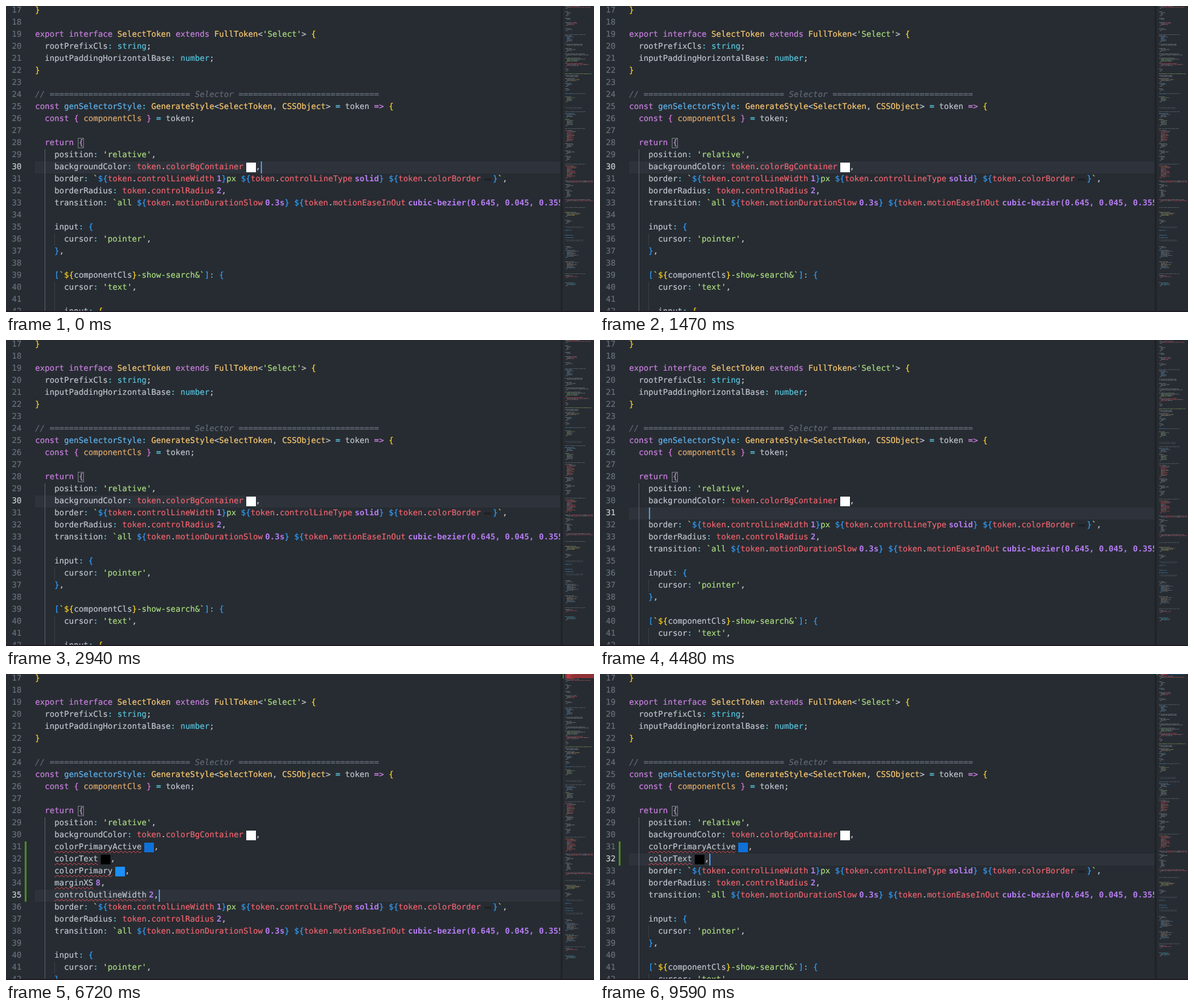
Write an HTML page with a canvas that moves like this. It is 974 by 508 pixels and loops after 9.94 s.

```html
<!DOCTYPE html>
<html lang="en">
<head>
<meta charset="utf-8">
<title>Editor: token hints</title>
<style>
  html, body { margin: 0; width: 100%; height: 100%; overflow: hidden; background: #272c32; }
  #stage {
    position: relative; width: 974px; height: 508px; overflow: hidden; background: #272c32;
    font: 13.31px/20px "DejaVu Sans Mono", "Liberation Mono", monospace;
    letter-spacing: .018px; -webkit-text-stroke: .2px;
    text-rendering: geometricPrecision; font-variant-ligatures: none; color: #c0c6ce;
  }
  .row { position: absolute; left: 0; width: 921px; height: 20px; overflow: hidden; white-space: pre; }
  .row.cur { background: linear-gradient(#2e333b, #2e333b) 48px 0 no-repeat; }
  .num { position: absolute; left: 9.8px; color: #68717c; }
  .active .num { color: #ccd1d7; }
  .code { position: absolute; left: 48.2px; top: 0; height: 20px; }
  .sel { background: #3e4450; border-radius: 3px; }
  .nl { padding-right: 8px; }
  .tail { display: inline-block; width: 8px; height: 20px; vertical-align: top; background: #3e4450; }
  .guide { position: absolute; top: 0; width: 1px; height: 20px; background: #3a4047; }
  .guide.on { background: #5a6169; }
  .added { position: absolute; left: 31px; width: 3px; height: 20px; background: #4b8a28; }
  .caret { position: absolute; top: 0; width: 2px; height: 20px; margin-left: .5px; background: #4d9df0; }
  .off .caret { visibility: hidden; }
  .p { color: #cb82e2; } .y { color: #fdcb72; } .g { color: #acdf80; } .c { color: #58c7df; }
  .r { color: #f0646f; } .b { color: #61b6f2; } .o { color: #e1aa6a; }
  .m { color: #626a75; font-style: italic; }
  .w { color: #59616c; }
  .i1 { color: #ffd21f; } .i2 { color: #d676d8; } .i3 { color: #2f9dfa; }
  .x { color: #bb8fc4; box-shadow: 0 0 0 1px #7d838a; }
  .picking .x { color: #d676d8; box-shadow: none; }
  .h { color: #b57df2; font-weight: bold; margin-left: 4px; -webkit-text-stroke: 0; }
  .s, .d { display: inline-block; width: 16px; height: 16px; margin: 2px 0 0 4.4px; vertical-align: top; }
  .d { margin-left: 4px; background: linear-gradient(#1e2227, #1e2227) 2px 6px / 12px 4px no-repeat; }
  .e {
    text-decoration: underline wavy #e5484d 1px; text-underline-offset: 2px;
    text-decoration-skip-ink: none;
  }
  #map { position: absolute; left: 922px; top: 0; }
  #edge { position: absolute; left: 918px; top: 0; width: 4px; height: 508px;
    background: linear-gradient(90deg, #24292e, #1c2024); }
  #foot { position: absolute; left: 0; bottom: 0; width: 974px; height: 2px; background: #201d26; }
</style>
</head>
<body>
<div id="stage">
  <div id="rows"></div>
  <div id="edge"></div>
  <canvas id="map" width="52" height="508"></canvas>
  <div id="foot"></div>
</div>
<script>
const LOOP = 9940, FIRST = 17, LINE = 20, TOP = -2, STEP = 1.67;
const stage = document.getElementById("stage");
const rows = document.getElementById("rows");
const map = document.getElementById("map").getContext("2d");

// "~" plus a letter switches the token class
const rule = "=".repeat(29);
const HEAD = [
  "~1}",
  "",
  "~pexport interface ~ySelectToken ~pextends ~yFullToken~t<~g'Select'~t> ~1{",
  "  rootPrefixCls~c: string~t;",
  "  inputPaddingHorizontalBase~c: number~t;",
  "~1}",
  "",
  `~m// ${rule} Selector ${rule}`,
  "~pconst ~bgenSelectorStyle~c: ~yGenerateStyle~t<~ySelectToken~t, ~yCSSObject~t> ~c= ~ttoken ~p=> ~1{",
  "  ~pconst ~2{ ~ocomponentCls ~2} ~c= ~ttoken;",
  "",
  "  ~preturn ~x{",
  "    position~c: ~g'relative'~t,",
  "    backgroundColor~c: ~rtoken~t.~rcolorBgContainer~s#fff~t,"
];
const TAIL = [
  "    border~c: ~g`~3${~rtoken~t.~rcontrolLineWidth~h1~3}~gpx ~3${~rtoken~t.~rcontrolLineType~hsolid~3} ${~rtoken~t.~rcolorBorder~d ~3}~g`~t,",
  "    borderRadius~c: ~rtoken~t.~rcontrolRadius~h2~t,",
  "    transition~c: ~g`all ~3${~rtoken~t.~rmotionDurationSlow~h0.3s~3} ${~rtoken~t.~rmotionEaseInOut~hcubic-bezier(0.645, 0.045, 0.355, 1)~3}~g`~t,",
  "    ",
  "    input~c: ~3{",
  "      cursor~c: ~g'pointer'~t,",
  "    ~3}~t,",
  "    ",
  "    ~3[~g`~1${~tcomponentCls~1}~g-show-search&`~3]~c: ~3{",
  "      cursor~c: ~g'text'~t,",
  "      ",
  "      input~c: ~1{"
];
const PASTED = [
  ["colorPrimaryActive", "s#0f70d8"], ["colorText", "s#000"], ["colorPrimary", "s#1b90fb"],
  ["marginXS", "h8"], ["controlOutlineWidth", "h2"]
];

const SCENES = [
  { at: 0, add: 0, cur: 30 },
  { at: 4480, add: 1, cur: 31, blank: true },
  { at: 4690, add: 1, cur: 31, blank: true, mark: true },
  { at: 5670, add: 5, cur: 35 },
  { at: 5880, add: 5, cur: 35, mark: true },
  { at: 6090, add: 5, cur: 35, mark: true, hints: true },
  { at: 7560, add: 5, cur: 34, mark: true, hints: true, pick: true },
  { at: 7630, add: 5, cur: 33, mark: true, hints: true, pick: true },
  { at: 7700, add: 5, cur: 32, mark: true, hints: true, pick: true },
  { at: 8610, add: 2, cur: 32, mark: true, hints: true }
];
// caret starts visible and flips at each time
const FLIPS = [350, 840, 1400, 1960, 2940, 3010, 3500, 4060, 4970, 5530,
  6160, 6720, 7210, 7560, 8260, 8610, 9100, 9590];

// overview blocks: top, rows, width, colours
const BLOCKS = [
  [0, 3, 42, "trr"], [9, 5, 10, "t"], [20, 2, 9, "t"], [27, 4, 20, "ttr"], [37, 3, 12, "t"],
  [47, 1, 34, "m"], [49, 7, 14, "tbt"], [63, 2, 29, "ttg"], [70, 4, 18, "t"], [79, 3, 39, "t"],
  [86, 5, 34, "ttg"], [95, 4, 40, "trr"], [104, 3, 6, "t"], [112, 1, 44, "yg"], [115, 2, 22, "t"],
  [120, 4, 24, "tty"], [128, 4, 12, "tc"], [137, 3, 8, "t"], [145, 1, 34, "bm"], [150, 6, 17, "ttg"],
  [168, 2, 28, "w"], [175, 1, 34, "m"], [178, 5, 19, "tb"], [188, 7, 14, "ttg"], [203, 1, 34, "m"],
  [206, 12, 18, "trro"], [228, 5, 14, "t"], [240, 4, 16, "t"], [249, 5, 10, "t"], [262, 1, 34, "m"],
  [265, 13, 20, "trro"], [290, 2, 46, "tr"], [296, 4, 14, "t"], [305, 8, 12, "t"], [321, 3, 46, "tr"],
  [334, 1, 34, "m"], [342, 5, 26, "tyg"], [355, 4, 12, "t"], [366, 2, 30, "w"], [372, 1, 11, "b"],
  [380, 1, 13, "b"], [384, 1, 14, "b"], [388, 2, 30, "w"], [399, 3, 12, "t"], [405, 8, 23, "bto"],
  [424, 8, 22, "bto"], [444, 1, 34, "m"], [447, 3, 20, "rt"], [459, 4, 18, "tc"]
];
const TINT = { t: "#959ca6", g: "#8fb86d", r: "#d9555f", b: "#4b9ad6", c: "#4aa6ba",
  y: "#d0a95f", o: "#c28f58", m: "#737b85", w: "#535c66" };

function el(tag, cls, parent, text) {
  const node = document.createElement(tag);
  node.className = cls;
  if (text) node.textContent = text;
  parent.append(node);
  return node;
}

function write(code, source, dotted) {
  const parts = source.split(/~(.)/);
  if (parts[0]) el("span", dotted ? "w" : "t", code, dotted ? "·".repeat(4) : parts[0]);
  for (let i = 1; i < parts.length; i += 2) {
    const key = parts[i], text = parts[i + 1];
    if (key === "s") el("span", "s", code).style.background = text;
    else if (key === "d") el("span", "d", code);
    else el("span", /\d/.test(key) ? "i" + key : key, code, text);
  }
}

function addedLines(scene) {
  if (scene.blank) return ["    "];
  return PASTED.slice(0, scene.add).map(([name, hint]) =>
    scene.hints ? `    ~e${name}~${hint}~t,` : `    ${name},`);
}

function drawCode(scene) {
  rows.textContent = "";
  stage.classList.toggle("picking", !!scene.pick);
  const lines = [...HEAD, ...addedLines(scene), ...TAIL];
  lines.forEach((line, i) => {
    const n = FIRST + i, y = TOP + i * LINE;
    if (y > 508) return;
    const here = n === scene.cur;
    const row = el("div", "row", rows);
    row.style.top = y + "px";
    if (here) row.classList.add("active");
    if (here && !scene.pick) row.classList.add("cur");
    el("span", "num", row, String(n));

    const indent = line.match(/^ */)[0].length;
    const picked = scene.pick && n > scene.cur && n <= 35;
    const code = el("span", "code", row);
    if (picked) code.classList.add("sel");
    if (picked && n < 35) code.classList.add("nl");
    write(code, line, picked);
    if (here) {
      const caret = el("i", "caret", code);
      if (scene.pick) {
        el("span", "tail", code);
        caret.style.right = "6px";
      }
    }

    if (indent >= 4) el("i", "guide on", row).style.left = "64px";
    if (indent >= 6) el("i", "guide", row).style.left = "80px";
    if (scene.mark && n > 30 && n <= 30 + scene.add) el("i", "added", row);
  });
}

function box(x, y, w, h, color, alpha) {
  map.globalAlpha = alpha;
  map.fillStyle = color;
  map.fillRect(x, y, w, h);
}

function drawMap(scene) {
  let seed = 11;
  const rnd = () => (seed = (seed * 16807) % 2147483647) / 2147483647;
  const drop = scene.add * STEP;
  map.clearRect(0, 0, 52, 508);
  for (const [top, count, width, tints] of BLOCKS) {
    for (let i = 0; i < count; i++) {
      const y = top + i * STEP + drop;
      const last = count > 2 && i === count - 1;
      const start = i === 0 ? 4 : last ? 5 : 7;
      const full = count < 3 || i === 1;
      const end = last ? 8 : 4 + width * (full ? 1 : 0.55 + 0.4 * rnd());
      for (let x = start; x < end;) {
        const w = Math.min(2 + rnd() * 6, end - x);
        const tint = TINT[tints[Math.floor(rnd() * tints.length)]];
        box(x, y, w, 1, tint, 0.55);
        x += w + 0.8;
      }
    }
  }
  if (scene.mark) box(0, 0, 2, drop - 1, "#4b8a28", 0.9);
  if (!scene.add || scene.blank) return;
  const errors = scene.hints && scene.add === 5 && !scene.pick;
  if (errors) box(4, 0, 48, 7, "#b3353b", 0.75);
  if (scene.pick) box(4, 1, 48, 5, "#27507c", 0.6);
  if (scene.add === 2) box(4, 0, 44, 1.5, "#27507c", 0.6);
  PASTED.slice(0, scene.add).forEach(([name], i) =>
    box(7, i * STEP, name.length * 0.6, 1, scene.hints ? "#e2484f" : TINT.t, 0.8));
}

const begin = performance.now();
let shown = null;

function frame(now) {
  const t = Math.max(0, now - begin) % LOOP;
  const scene = SCENES.filter(s => s.at <= t).pop();
  if (scene !== shown) {
    shown = scene;
    drawCode(scene);
    drawMap(scene);
  }
  const flips = FLIPS.filter(f => f <= t).length;
  stage.classList.toggle("off", flips % 2 === 1);
  requestAnimationFrame(frame);
}
frame(begin);
</script>
</body>
</html>
```
